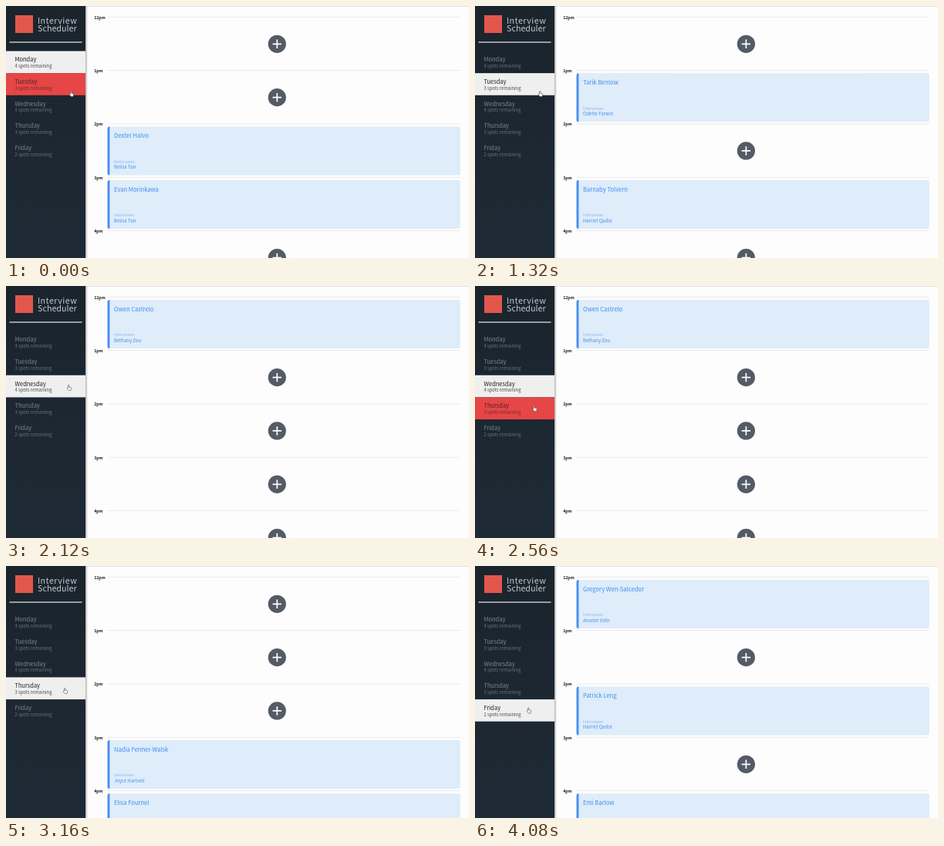
An HTML page that plays this animation: 600 by 327 pixels, repeating every 4.2 s.

```html
<!DOCTYPE html>
<html lang="en">
<head>
<meta charset="utf-8">
<title>Interview Scheduler</title>
<style>
  html, body { margin: 0; width: 100%; height: 100%; overflow: hidden; background: #fdfdfd; }
  svg { display: block; width: 100%; height: 100%; }
  text { font-family: "Noto Sans CJK SC", "Noto Sans CJK JP", "Noto Sans CJK", "Source Sans Pro", "Noto Sans", sans-serif; }
  .brand { font-size: 10.75px; font-weight: 300; fill: #c3c8cc; }
  .day { font-size: 7.45px; fill: #7c868f; }
  .spots { font-size: 5.8px; fill: #69747d; }
  .hover .day { fill: #4c222b; }
  .hover .spots { fill: #74282f; }
  .selected .day { fill: #1f1f21; }
  .selected .spots { fill: #48484b; }
  .hour { font-size: 5.2px; font-weight: 700; fill: #161616; }
  .name { font-size: 7.6px; fill: #3f8df2; }
  .label { font-size: 4.95px; font-weight: 300; fill: #84b5f4; }
  .interviewer { font-size: 5.95px; fill: #3f8df2; }
</style>
</head>
<body>
<svg viewBox="0 0 600 327" preserveAspectRatio="none">
  <defs>
    <linearGradient id="navy" x2="0" y2="1">
      <stop stop-color="#1a242d"/><stop offset="1" stop-color="#1e2a35"/>
    </linearGradient>
    <linearGradient id="shade">
      <stop stop-color="#000" stop-opacity=".3"/><stop offset="1" stop-color="#000" stop-opacity="0"/>
    </linearGradient>
  </defs>
  <rect width="600" height="327" fill="#fdfdfd"/>
  <rect x="103" width="497" height=".8" fill="#dedede"/>
  <g id="schedule"></g>
  <rect x="103" width="3" height="327" fill="url(#shade)"/>
  <rect width="103" height="327" fill="url(#navy)"/>
  <rect x="12" y="12" width="23" height="23" fill="#e2574c"/>
  <text class="brand" x="41" y="22.6" letter-spacing=".45">Interview</text>
  <text class="brand" x="41" y="33">Scheduler</text>
  <rect x="4.5" y="46.4" width="94" height="1.2" fill="#e9ebed"/>
  <g id="days"></g>
  <path id="cursor" fill="#fff" stroke="#333" stroke-width=".55" stroke-linejoin="round"
    d="M-1.5 .2V-2.8a.7 .7 0 0 1 1.4 0V-.7l2 .4q.9 .2 .8 1.1l-.4 2q-.1 .7-.8 .7H-.4q-.6 0-.9-.5L-2.8 .9q-.3-.9 .5-.9z"/>
</svg>
<script>
const LOOP = 4200, TICK = 40;
const ROW_TOP = 58.5, ROW_STEP = 28.64;
const HOUR_TOP = 14.7, HOUR_STEP = 69.33;
const HOURS = ["12pm", "1pm", "2pm", "3pm", "4pm"];

// Bookings map an hour index to [student, interviewer].
const DAYS = [
  { name: "Monday", spots: 4, from: 0, bookings: {
    2: ["Dexter Halvo", "Belisa Tun"], 3: ["Evan Morinkawa", "Belisa Tun"] } },
  { name: "Tuesday", spots: 3, from: 1280, bookings: {
    1: ["Tarik Benlow", "Odette Farwin"], 3: ["Barnaby Tolvern", "Harriet Qadol"] } },
  { name: "Wednesday", spots: 4, from: 2120, bookings: {
    0: ["Owen Castrelo", "Bethany Zou"] } },
  { name: "Thursday", spots: 3, from: 3080, bookings: {
    3: ["Nadia Fenner-Walsk", "Joyce Hartvell"], 4: ["Elisa Fournel", "Joyce Hartvell"] } },
  { name: "Friday", spots: 2, from: 3840, bookings: {
    0: ["Gregory Wen-Salcedor", "Anselm Vohr"], 2: ["Patrick Leng", "Harriet Qadol"],
    4: ["Emi Barlow", "Anselm Vohr"] } },
];

const START = [85, 114];
const MOVES = [
  { begin: 1400, end: 1800, to: [82, 132] },
  { begin: 2240, end: 2640, to: [77, 162] },
  { begin: 3280, end: 3680, to: [70, 187.5] },
];

const el = id => document.getElementById(id);
const text = (cls, x, y, value) => `<text class="${cls}" x="${x}" y="${y}">${value}</text>`;

function card(y, [student, interviewer]) {
  const top = y + 3.2;
  return `<rect x="131.5" y="${top}" width="457.3" height="63" rx="2.5" fill="#dfecf9"/>
    <path d="M134.4 ${top}h-.4a2.5 2.5 0 0 0-2.5 2.5v58a2.5 2.5 0 0 0 2.5 2.5h.4z" fill="#4a90f0"/>` +
    text("name", 140, y + 17.9, student) +
    text("label", 140, y + 50.7, "Interviewer") +
    text("interviewer", 140, y + 57.9, interviewer);
}

function addButton(y) {
  const cy = y + 34.6;
  return `<circle cx="351.3" cy="${cy}" r="11.6" fill="#545b67"/>
    <path d="M345.6 ${cy}h11.4M351.3 ${cy - 5.7}v11.4" stroke="#fff" stroke-width="1.7"/>`;
}

function schedule(day) {
  return HOURS.map((hour, i) => {
    const y = HOUR_TOP + i * HOUR_STEP;
    const booking = day.bookings[i];
    return text("hour", 114.2, y + 2.1, hour) +
      `<rect x="132" y="${y - .8}" width="456.5" height=".8" fill="#e6e6e6"/>` +
      (booking ? card(y, booking) : addButton(y));
  }).join("");
}

function dayList(selected, hovered) {
  return DAYS.map((day, i) => {
    const y = ROW_TOP + i * ROW_STEP;
    const state = i === selected ? "selected" : i === hovered ? "hover" : "";
    const fill = { selected: "#f0eff0", hover: "#e64646" }[state] || "none";
    return `<g class="${state}"><rect y="${y}" width="103" height="${ROW_STEP}" fill="${fill}"/>` +
      text("day", 11.5, y + 13.8, day.name) +
      text("spots", 11.5, y + 21.6, day.spots + " spots remaining") + "</g>";
  }).join("");
}

function cursorAt(t) {
  let [x, y] = START;
  for (const { begin, end, to } of MOVES) {
    const p = Math.min(1, Math.max(0, (t - begin) / (end - begin)));
    const eased = p * p * (3 - 2 * p);
    x += (to[0] - x) * eased;
    y += (to[1] - y) * eased;
  }
  return [x, y];
}

let shownDay, shownState;

function render(time) {
  const t = Math.floor((time % LOOP) / TICK) * TICK;
  const selected = DAYS.filter(day => day.from <= t).length - 1;
  const [x, y] = cursorAt(t);
  const hovered = Math.floor((y - 3 - ROW_TOP) / ROW_STEP);
  const state = selected + "/" + hovered;
  if (selected !== shownDay) el("schedule").innerHTML = schedule(DAYS[selected]);
  if (state !== shownState) el("days").innerHTML = dayList(selected, hovered);
  shownDay = selected;
  shownState = state;
  el("cursor").setAttribute("transform", `translate(${x} ${y})`);
}

const begun = performance.now();
function frame() {
  render(performance.now() - begun);
  requestAnimationFrame(frame);
}
frame();
</script>
</body>
</html>
```
